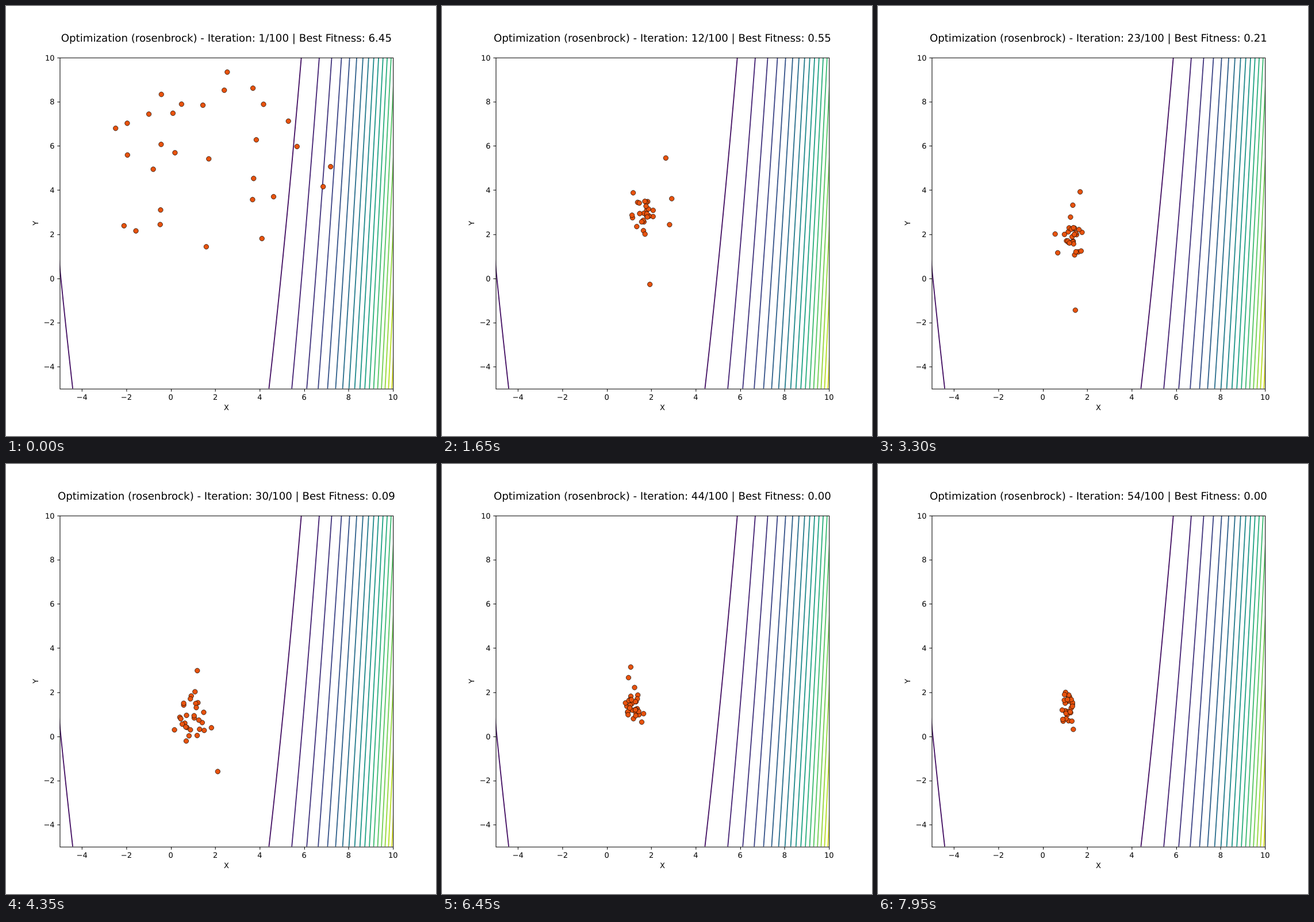
Recreate the animation shown at these times as an HTML page. Size 748 by 748 pixels, loop 8000 ms.

```html
<!DOCTYPE html>
<html lang="en">
<head>
<meta charset="utf-8">
<title>Swarm optimization</title>
<style>
  html, body { margin: 0; height: 100%; overflow: hidden; background: #fff; }
  svg { display: block; }
  text { font: 13.89px "DejaVu Sans", sans-serif; text-anchor: middle; text-rendering: geometricPrecision; }
  #title { font-size: 19.44px; }
  .end { text-anchor: end; }
  #lines { fill: none; stroke-width: 2; }
  #frame { fill: none; stroke: #000; stroke-width: 1.11; }
  #dots { fill: #e8530e; stroke: #000; stroke-width: .75; }
</style>
</head>
<body>
<svg width="748" height="748" viewBox="0 0 800 800">
  <clipPath id="plot"><rect x="100" y="96" width="620" height="616"/></clipPath>
  <g id="lines" clip-path="url(#plot)"></g>
  <g id="dots"></g>
  <path id="frame"/>
  <g id="labels">
    <text x="410" y="752">X</text>
    <text transform="translate(60 404) rotate(-90)">Y</text>
  </g>
  <text id="title" x="410" y="66.5"></text>
</svg>
<script>
const $ = id => document.getElementById(id);
const px = x => 100 + (x + 5) * 620 / 15;
const py = y => 712 - (y + 5) * 616 / 15;
const mix = (a, b, f) => a + (b - a) * f;

function add(parent, tag, attrs, text = '') {
  const el = document.createElementNS('http://www.w3.org/2000/svg', tag);
  for (const key in attrs) el.setAttribute(key, attrs[key]);
  el.textContent = text;
  return parent.appendChild(el);
}

// Viridis colour map, u in 0..1
const viridis = ['440154', '482475', '414487', '355f8d', '2a788e', '21918c',
  '22a884', '44bf70', '7ad151', 'bddf26', 'fde725']
  .map(hex => [0, 2, 4].map(i => parseInt(hex.slice(i, i + 2), 16)));
function colour(u) {
  const i = Math.floor(u * 10);
  return `rgb(${viridis[i].map((c, k) => Math.round(mix(c, viridis[i + 1][k], u * 10 - i)))})`;
}

// Contours of 100 (y - x²)², one every 60000
for (let n = 1; n <= 18; n++) {
  for (const side of [-1, 1]) {
    const pts = [];
    for (let y = -5; y <= 10; y += 0.25) {
      const x = side * Math.sqrt(y + Math.sqrt(n * 60000) / 10);
      pts.push(px(x).toFixed(2) + ',' + py(y).toFixed(2));
    }
    add($('lines'), 'polyline', { points: pts.join(' '), stroke: colour(n / 19) });
  }
}

// Axes
const snap = v => Math.round(v) + .5;
let axes = 'M100.5 96.5H720.5V712.5H100.5Z';
for (let v = -4; v <= 10; v += 2) {
  const x = px(v), y = py(v), label = String(v).replace('-', '\u2212');
  axes += `M${snap(x)} 712.5v5M100.5 ${snap(y)}h-5`;
  add($('labels'), 'text', { x, y: 733 }, label);
  add($('labels'), 'text', { x: 90.5, y: y + 5.3, class: 'end' }, label);
}
$('frame').setAttribute('d', axes);

// Swarm over time: centre, spread, how much wider the strays roam
const keys = [
  { step: 0, best: 6.45, x: 1.6, y: 5.4, sx: 3.1, sy: 2, stray: 1 },
  { step: 7, best: .61, x: 1.6, y: 2.9, sx: .45, sy: .6, stray: 3 },
  { step: 15, best: .49, x: 1.7, y: 2.9, sx: .2, sy: .4, stray: 4 },
  { step: 29, best: .09, x: .9, y: .85, sx: .37, sy: .7, stray: 2.5 },
  { step: 37, best: .004, x: 1.2, y: 1.4, sx: .2, sy: .4, stray: 3 },
  { step: 53, best: .001, x: 1.15, y: 1.4, sx: .16, sy: .38, stray: 2 }
];

function swarm(step) {
  let k = 0;
  while (k < keys.length - 2 && step >= keys[k + 1].step) k++;
  const from = keys[k], to = keys[k + 1];
  const f = (step - from.step) / (to.step - from.step), now = {};
  for (const key in from) now[key] = mix(from[key], to[key], f);
  now.best = from.best * (to.best / from.best) ** f;
  return now;
}

function random(seed) {
  const v = Math.sin(seed * 12.9898) * 43758.5453;
  return v - Math.floor(v);
}
function scatter(seed) {
  const r = 2 * Math.sqrt(random(seed)), a = 2 * Math.PI * random(seed + .5);
  return [r * Math.cos(a), r * Math.sin(a)];
}
// Each particle drifts to a new random offset every 4 steps
function offset(i, step) {
  const n = Math.floor(step / 4), next = scatter((n + 1) * 30 + i + 1);
  return scatter(n * 30 + i + 1).map((v, k) => mix(v, next[k], step / 4 - n));
}

const dots = Array.from({ length: 30 }, () => add($('dots'), 'circle', { r: 4.5 }));

function draw(step) {
  const s = swarm(step);
  dots.forEach((dot, i) => {
    const [dx, dy] = offset(i, step), reach = i % 5 ? 1 : s.stray;
    dot.setAttribute('cx', px(s.x + s.sx * dx * reach));
    dot.setAttribute('cy', py(s.y + s.sy * dy * reach));
  });
  $('title').textContent =
    `Optimization (rosenbrock) - Iteration: ${step + 1}/100 | Best Fitness: ${s.best.toFixed(2)}`;
}

let shown = -1;
function tick() {
  const step = Math.floor(performance.now() % 8000 / 150);
  if (step !== shown) draw(shown = step);
  requestAnimationFrame(tick);
}
tick();
</script>
</body>
</html>
```
